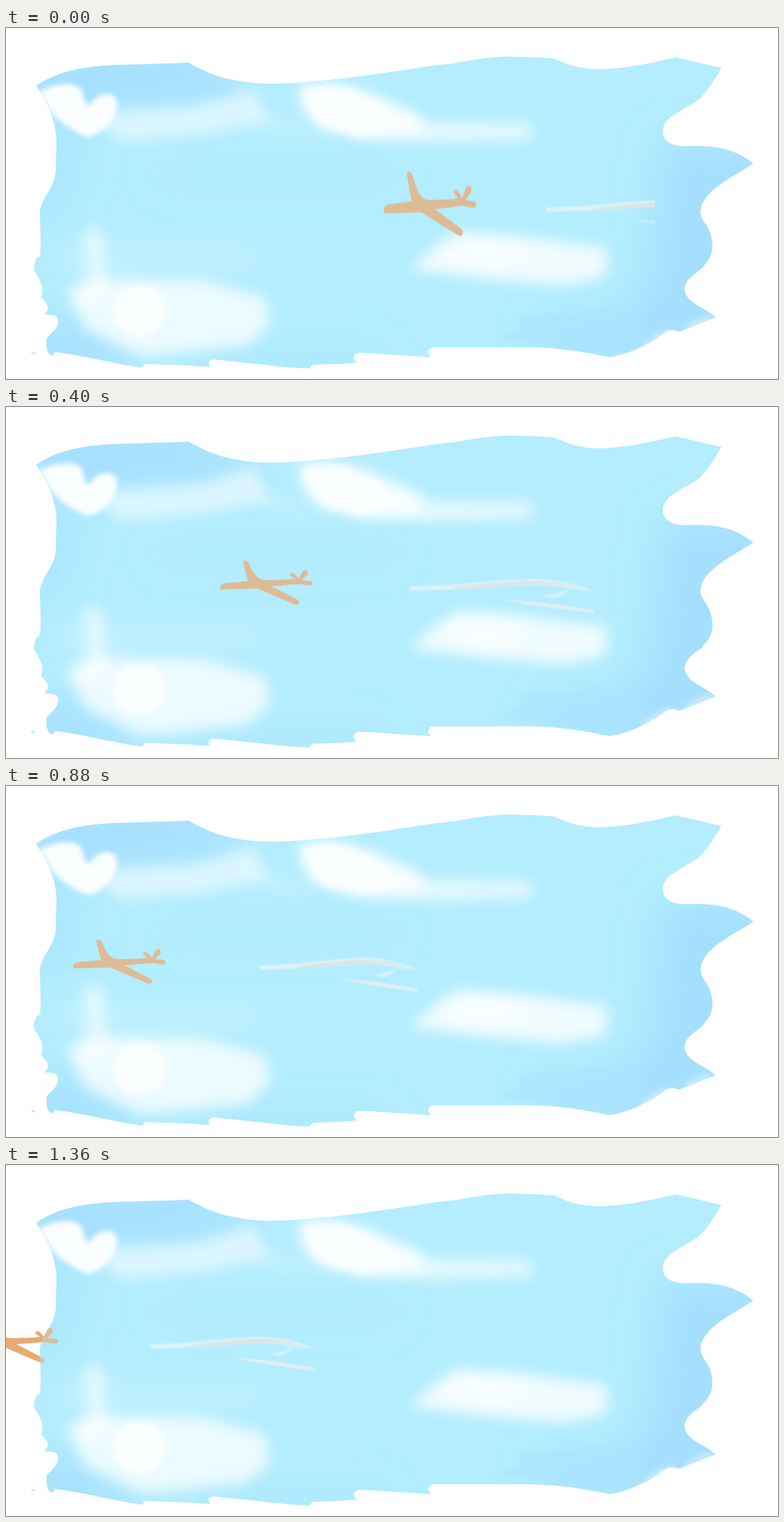
These frames come from a looping animation (1024 px wide and 466 px high, 1.44 s). An HTML page:

```html
<!DOCTYPE html>
<html lang="en">
<head>
<meta charset="utf-8">
<title>Plane over painted sky</title>
<style>
html, body { margin: 0; width: 100%; height: 100%; overflow: hidden; background: #fff; }
svg { display: block; width: 100%; height: 100%; }
</style>
</head>
<body>
<svg viewBox="0 0 1024 466">
  <defs>
    <path id="skyShape" d="M40,77 C60,62 90,53 130,50 C165,48 205,48 242,46 C275,65 305,73 350,74
      C400,73 450,67 500,60 C540,54 570,49 594,47 C620,42 640,39 660,38 C690,38 715,39 729,41
      C750,51 765,55 790,55 C825,53 855,47 888,39 L949,53 C938,72 929,84 922,92
      C905,108 871,115 871,138 C873,155 890,157 905,157 C935,156 965,158 991,180
      C970,195 921,215 921,245 C923,258 929,257 935,275 C940,298 935,305 922,320
      C905,332 900,338 900,348 C903,366 925,370 941,384 L893,403 C880,398 873,404 865,411
      C850,420 830,432 801,437 C765,430 740,425 700,424 L567,424 C558,425 559,434 564,437
      L470,431 C459,432 459,441 466,444 L440,446 L409,447 Q404,448 403,452 L380,451 L276,440
      C267,440 268,448 271,450 L240,448 L185,446 L180,451 C140,445 100,434 65,430 L61,435
      C54,432 53,423 54,412 C60,404 70,400 69,388 C68,378 55,382 51,380 C60,372 54,364 46,357
      C50,350 50,340 37,322 C37,310 41,303 45,304 L46,290 L45,243 C50,220 67,210 66,185
      L67,150 C66,125 57,100 40,77 Z M32,433 L38,430 V433 Z"/>
    <path id="plane" d="M0,239 Q1,235 6,234 L37,231 L31,208 C30,203 36,203 38,207 L43,218 Q47,226 55,229
      L60,230 L92,229 L99,228 L93,224 C92,219 98,220 100,223 L104,228 L109,219 C112,214 118,217 116,222
      L109,230 L119,231 C124,231 124,237 119,237 L105,235 L68,238 L103,256 C107,259 104,264 99,262
      L75,252 L50,241 L5,242 Q0,243 0,239 Z"/>
    <clipPath id="inSky"><use href="#skyShape"/></clipPath>
    <clipPath id="trailEdge"><rect width="861" height="466"/></clipPath>
    <filter id="b1" x="-20%" y="-60%" width="140%" height="220%"><feGaussianBlur stdDeviation="1.2"/></filter>
    <filter id="b3" x="-50%" y="-50%" width="200%" height="200%"><feGaussianBlur stdDeviation="3"/></filter>
    <filter id="b9" x="-50%" y="-100%" width="200%" height="300%"><feGaussianBlur stdDeviation="9"/></filter>
    <filter id="b25" x="-50%" y="-100%" width="200%" height="300%"><feGaussianBlur stdDeviation="25"/></filter>
  </defs>

  <use class="plane" href="#plane" fill="#e8aa72"/>

  <g clip-path="url(#inSky)">
    <rect width="1024" height="466" fill="#b3edfe"/>
    <g fill="#a5dffe" filter="url(#b25)">
      <path d="M20,30 H250 L340,90 L170,100 L60,130 Z"/>
      <path d="M870,150 H1020 V420 H780 L850,340 Z"/>
      <path d="M30,385 L100,400 L200,460 H30 Z"/>
      <path d="M30,150 H110 L70,260 H20 Z" opacity=".5"/>
      <path d="M200,185 H520 V205 H200 Z" opacity=".25"/>
      <path d="M260,435 H500 V470 H260 Z" opacity=".5"/>
      <path d="M720,385 H900 V440 H700 Z" opacity=".8"/>
    </g>
    <path d="M680,384 L708,380 L750,383 L775,374 L806,376 L804,388 L850,384 L840,415 L790,425 L650,412 L684,398 Z"
      fill="#a9e3ff" opacity=".55" filter="url(#b3)"/>

    <g fill="#fff" filter="url(#b9)">
      <path d="M110,112 L250,104 L330,80 L345,125 L260,142 L150,151 Z" opacity=".55"/>
      <path d="M310,90 L390,130 L410,150 L340,135 Z" opacity=".2"/>
      <path d="M480,116 L560,124 L698,126 V149 L560,152 L450,144 Z" opacity=".66"/>
      <path d="M534,320 L575,285 L600,270 L680,276 L798,292 L796,330 L740,342 L640,334 Z" opacity=".8"/>
      <path d="M80,345 L130,332 L260,334 L345,358 L350,395 L320,422 L180,436 L105,400 Z" opacity=".75"/>
      <path d="M102,270 Q118,258 130,272 L132,325 L140,350 L85,375 L108,325 Z" opacity=".6"/>
      <path d="M70,285 H330 V325 H70 Z" opacity=".14"/>
    </g>
    <g fill="#fff" filter="url(#b3)">
      <path d="M44,84 C65,74 96,68 102,86 Q102,98 110,104 C120,86 140,82 147,96
        C150,116 132,138 110,145 C90,138 64,122 54,102 Z" opacity=".95"/>
      <ellipse cx="177" cy="375" rx="36" ry="34" opacity=".75"/>
      <path d="M836,426 L868,402 L890,400 L862,418 Z" opacity=".4"/>
      <path d="M905,392 L930,382 L942,386 L900,402 Z" opacity=".4"/>
    </g>
    <g fill="#fff" filter="url(#b9)">
      <path d="M388,75 L430,72 L480,84 L550,115 L552,140 L470,144 L415,134 L392,108 Z" opacity=".85"/>
      <ellipse cx="635" cy="300" rx="55" ry="16" opacity=".6"/>
    </g>
    <path d="M392,84 Q425,70 462,82 L500,102 L520,128 L475,143 L430,137 L408,120 Z"
      fill="#fff" opacity=".6" filter="url(#b3)"/>

    <g clip-path="url(#trailEdge)">
      <g id="trail">
        <g filter="url(#b1)">
          <path d="M0,238 C70,237 110,229 165,228 C200,229 225,236 246,245 C220,242 195,237 165,236
            C115,238 75,243 0,244 Z" fill="#e2f4f8" opacity=".9"/>
          <path d="M60,239 C105,235 130,231 165,231 C195,232 213,236 230,241 C205,237 190,235 165,235
            C130,236 105,240 60,241 Z" fill="#dedfdd" opacity=".85"/>
          <path d="M118,255 C165,258 205,263 246,270 L244,273 C210,269 170,265 118,255 Z" fill="#e8eff0"/>
          <path d="M172,251 Q195,250 212,241 Q209,250 192,254 Z" fill="#d8f4fb" opacity=".9"/>
        </g>
      </g>
    </g>
    <use class="plane" href="#plane" fill="#debb95"/>
  </g>
</svg>
<script>
const LOOP = 1440, STEP = 80;
const times = [0, 160, 400, 560, 880, 1200, 1360];
const noseX = [501, 407, 284, 212, 89, -9, -54];
const trailX = [717, 655, 535, 474, 336, 240, 192];
const trailW = [250, 250, 246, 219, 211, 274, 219];
const planes = document.querySelectorAll('.plane');
const trail = document.getElementById('trail');

function segment(t) {
  let i = 0;
  while (i < times.length - 2 && t > times[i + 1]) i++;
  return i;
}

function linear(keys, t) {
  const i = segment(t);
  return keys[i] + (keys[i + 1] - keys[i]) * (t - times[i]) / (times[i + 1] - times[i]);
}

// Cubic through the keys, for the gradually slowing plane.
function smooth(keys, t) {
  const i = segment(t), last = times.length - 1;
  const slope = k => {
    const a = Math.max(k - 1, 0), b = Math.min(k + 1, last);
    return (keys[b] - keys[a]) / (times[b] - times[a]);
  };
  const h = times[i + 1] - times[i], u = (t - times[i]) / h, v = 1 - u;
  return v * v * (1 + 2 * u) * keys[i] + u * u * (3 - 2 * u) * keys[i + 1]
    + h * u * v * (v * slope(i) - u * slope(i + 1));
}

function draw(ms) {
  const t = Math.floor(ms % LOOP / STEP) * STEP;
  const tall = 1 + 0.46 * Math.max(0, 1 - t / 160);
  const pose = `translate(${smooth(noseX, t)} 233) scale(1 ${tall}) translate(0 -233)`;
  planes.forEach(p => p.setAttribute('transform', pose));
  trail.setAttribute('transform', `translate(${linear(trailX, t)} 0) scale(${linear(trailW, t) / 246} 1)`);
}

const start = performance.now();
function tick() {
  draw(performance.now() - start);
  requestAnimationFrame(tick);
}
tick();
</script>
</body>
</html>
```
